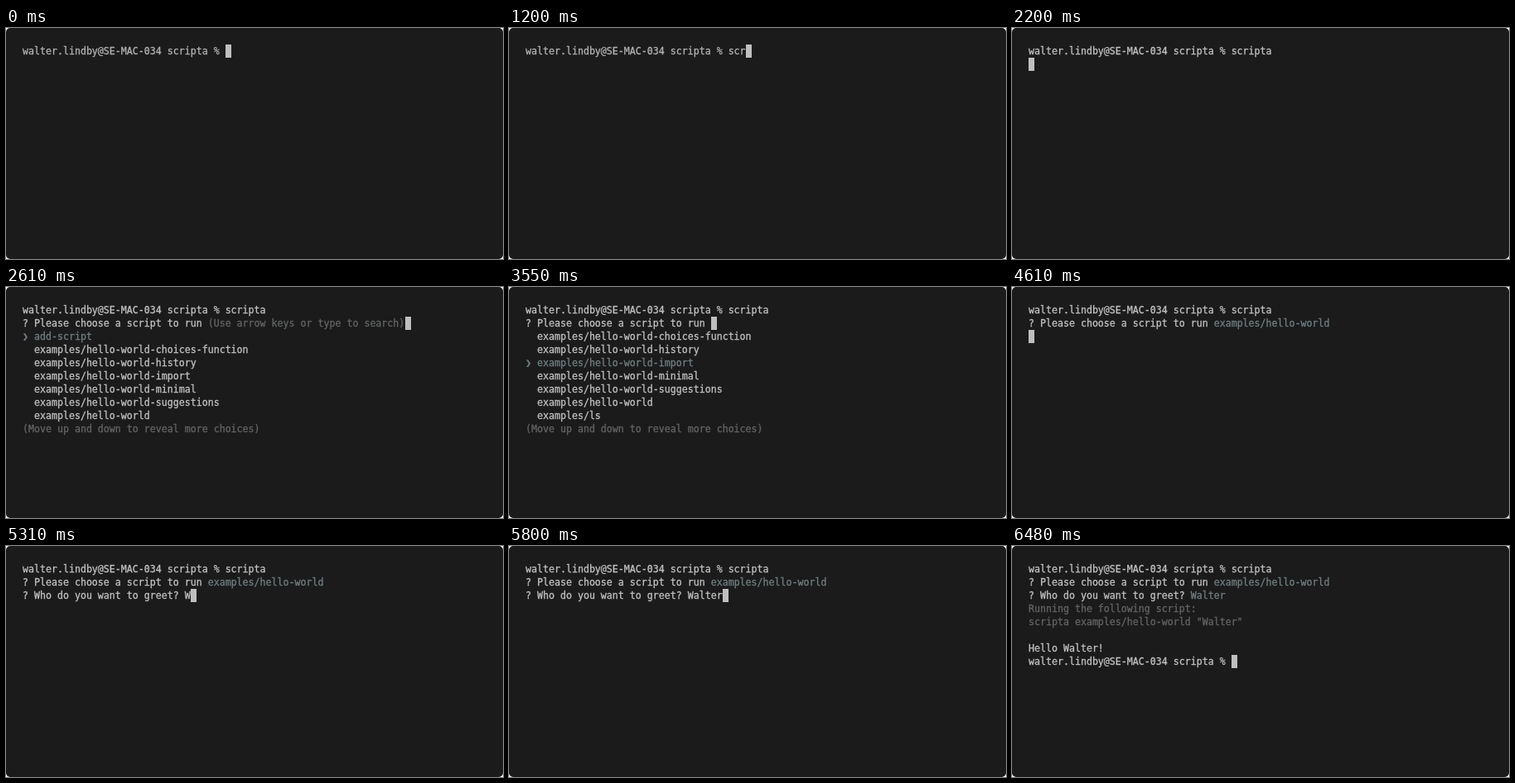
Animation of 600 by 280 pixels, one loop 8 s. Source, as an HTML page:

```html
<!DOCTYPE html>
<html lang="en">
<head>
<meta charset="utf-8">
<title>Terminal session</title>
<style>
  html, body { margin: 0; width: 100%; height: 100%; overflow: hidden; background: #fff; }
  #screen {
    position: relative; box-sizing: border-box; width: 600px; height: 280px;
    padding: 20px; border-radius: 5px; background: #1b1b1b; color: #b2b2b2;
    font: 11.628px/16px "DejaVu Sans Mono", monospace;
    -webkit-text-stroke: 0.3px currentColor;
    font-variant-ligatures: none; overflow: hidden;
  }
  #screen.running { color: #c2c2c2; }
  .row { height: 16px; white-space: pre; }
  .accent { color: #707f82; }
  .dim { color: #636464; }
  .pointer { display: inline-block; width: 7px; height: 16px; vertical-align: top; }
  #cursor { position: absolute; left: 20px; top: 20px; width: 7px; height: 16px; background: #bfbfbf; }
</style>
</head>
<body>
<div id="screen"><div id="rows"></div><div id="cursor"></div></div>
<script>
const LOOP = 8000, CELL_W = 7, CELL_H = 16, PAGE = 7;
const NAME = "Walter";
const PROMPT = "walter.lindby@SE-MAC-034 scripta % ";
const COMMAND = "scripta";
const CHOOSE = "? Please choose a script to run ";
const GREET = "? Who do you want to greet? ";
const hello = "examples/hello-world";
const choices = [
  "add-script",
  ...["choices-function", "history", "import", "minimal", "suggestions"].map(s => `${hello}-${s}`),
  hello,
  "examples/ls",
];

const span = (cls, text) => `<span class="${cls}">${text}</span>`;
const accent = text => span("accent", text);
const dim = text => span("dim", text);

const entered = PROMPT + COMMAND;
const chosen = CHOOSE + accent(hello);
const greeted = GREET + accent(NAME);
const report = [
  entered, chosen, greeted,
  dim("Running the following script:"),
  dim(`scripta ${hello} "${NAME}"`),
  "",
];

// The cursor sits at the end of row `at`.
const view = (rows, at = rows.length - 1) => ({ rows, at });

// The pointer stops at the third line, then the list wraps around under it.
function menu(selected) {
  const top = Math.max(0, selected - 2);
  const list = Array.from({ length: PAGE }, (_, i) => {
    const text = choices[(top + i) % choices.length];
    return top + i === selected
      ? accent(span("pointer", "❯") + " " + text)
      : "  " + text;
  });
  const hint = selected ? "" : dim("(Use arrow keys or type to search)");
  return view([entered, CHOOSE + hint, ...list, dim("(Move up and down to reveal more choices)")], 1);
}

const typing = (times, word, before, prompt) => times.map((t, i) =>
  [t, view([...before, prompt + word.slice(0, i + 1)])]);

const steps = [
  [0, view([PROMPT])],
  ...typing([800, 990, 1200, 1420, 1500, 1570, 1650], COMMAND, [], PROMPT),
  [2200, view([entered, ""])],
  ...[2610, 3230, 3410, 3550, 3700, 3830, 4180].map((t, i) => [t, menu(i)]),
  [4610, view([entered, chosen, ""])],
  [4710, view([entered, chosen, GREET])],
  ...typing([5310, 5460, 5520, 5680, 5740, 5800], NAME, [entered, chosen], GREET),
  [6380, view([...report, ""])],
  [6480, view([...report, `Hello ${NAME}!`, PROMPT])],
];

const screenBox = document.getElementById("screen");
const rowsBox = document.getElementById("rows");
const cursor = document.getElementById("cursor");
let shown = -1;

function draw(index) {
  const [time, { rows, at }] = steps[index];
  rowsBox.innerHTML = rows.map(row => `<div class="row">${row}</div>`).join("");
  const column = rowsBox.children[at].textContent.length;
  cursor.style.transform = `translate(${column * CELL_W}px, ${at * CELL_H}px)`;
  screenBox.classList.toggle("running", time >= 2200);
}

const start = performance.now();
function tick() {
  const time = Math.max(0, performance.now() - start) % LOOP;
  const index = steps.findLastIndex(([from]) => from <= time);
  if (index !== shown) draw(shown = index);
  requestAnimationFrame(tick);
}
tick();
</script>
</body>
</html>
```
